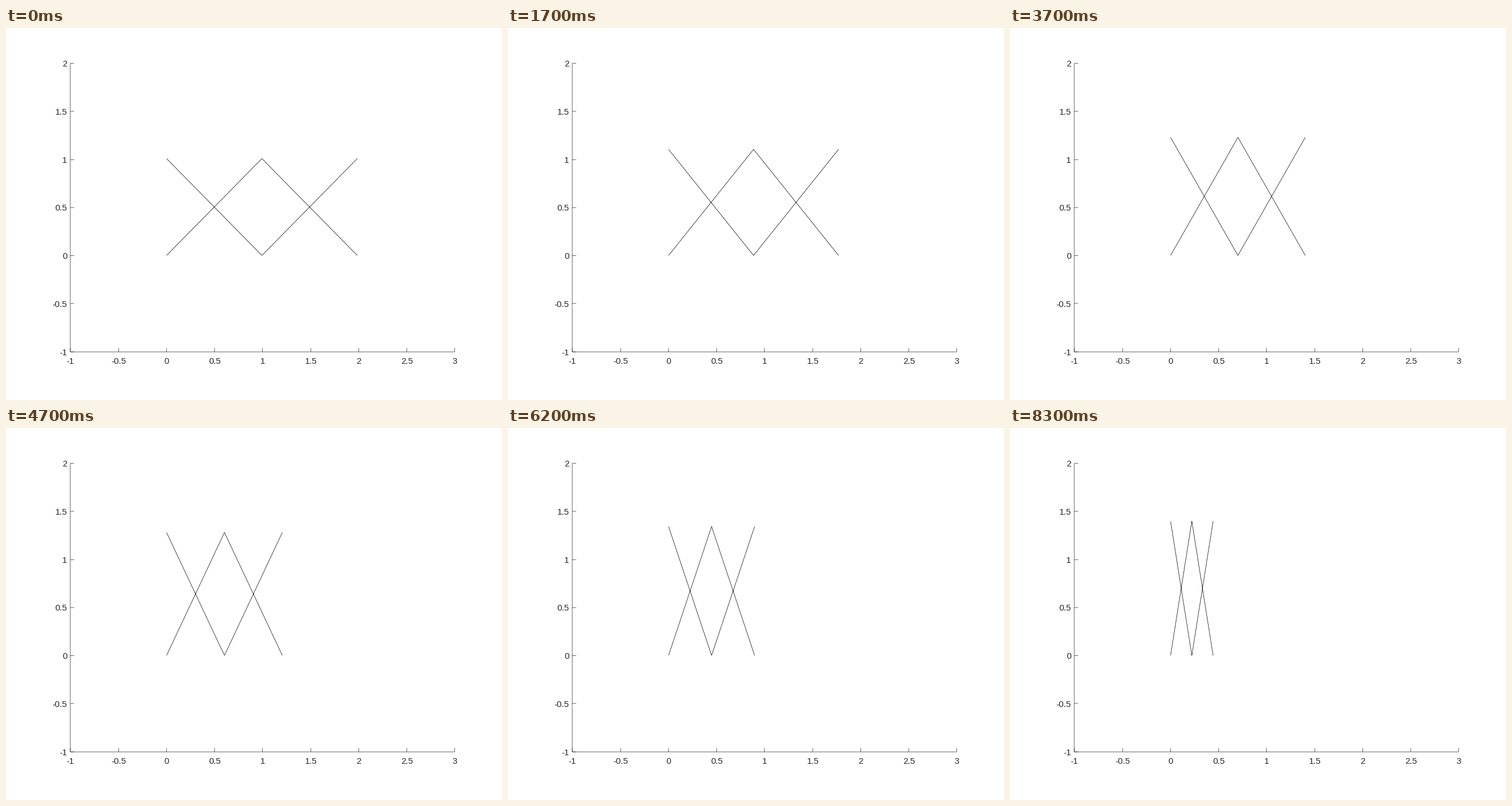
Write a matplotlib script that moves like this. It is 864 px wide and 648 px high and loops after 8.4 s.

```python
import numpy as np
import matplotlib.pyplot as plt
from matplotlib.animation import FuncAnimation

FRAMES, INTERVAL = 84, 100
HOLD = 4                      # extra frames spent on the first pose
BAR = np.sqrt(2)              # length of each bar
STEP = np.pi / 400            # turn per frame
INK = (0.15, 0.15, 0.15)

# The plot is laid out on a 1200 x 900 sheet scaled down to the stage.
SHEET_W, SHEET_H = 1200, 900
LEFT, BOTTOM, UNIT = 156, 117, 232.5
TICK = 9.3
LINE = 0.48                   # one sheet pixel, in points

plt.rcParams["font.family"] = "Liberation Sans"

fig = plt.figure(figsize=(8, 6), dpi=108, facecolor="white")
ax = fig.add_axes([0, 0, 1, 1])
ax.set(xlim=(0, SHEET_W), ylim=(0, SHEET_H))
ax.axis("off")


def sheet_x(x):
    return LEFT + UNIT * (np.asarray(x) + 1)


def sheet_y(y):
    return BOTTOM + UNIT * (np.asarray(y) + 1)


def pixel(v):
    """Centre of the sheet pixel that holds v."""
    return np.ceil(v) - 0.5


def stroke(x, y, color=INK):
    line, = ax.plot(x, y, color=color, lw=LINE, snap=False,
                    solid_capstyle="butt")
    return line


def label(value, x, y, align):
    ax.text(x, y, f"{value:g}", ha=align, va="baseline",
            fontsize=10, color=INK)


x0, x1 = pixel(sheet_x([-1, 3]))
y0, y1 = pixel(sheet_y([-1, 2]))
stroke([x0, x1], [y0, y0])
stroke([x0, x0], [y0, y1])

for v in np.arange(-1, 3.1, 0.5):
    x = pixel(sheet_x(v))
    stroke([x, x], [y0, y0 + TICK])
    label(v, sheet_x(v), 87.5, "center")
for v in np.arange(-1, 2.1, 0.5):
    y = pixel(sheet_y(v))
    stroke([x0, x0 + TICK], [y, y])
    label(v, 147.8, sheet_y(v) - 8, "right")

bars = stroke([], [], "black")


def update(i):
    angle = np.pi / 4 + STEP * (max(0, i - HOLD) + 1)
    x, y = BAR * np.cos(angle), BAR * np.sin(angle)
    gap = np.nan
    xs = [0, x, gap, 0, x, gap, x, 2 * x, gap, x, 2 * x]
    ys = [0, y, gap, y, 0, gap, 0, y, gap, y, 0]
    bars.set_data(sheet_x(xs), sheet_y(ys) + 0.25)
    return bars,


anim = FuncAnimation(fig, update, frames=FRAMES, interval=INTERVAL,
                     repeat=True, repeat_delay=0)
plt.show()
```
